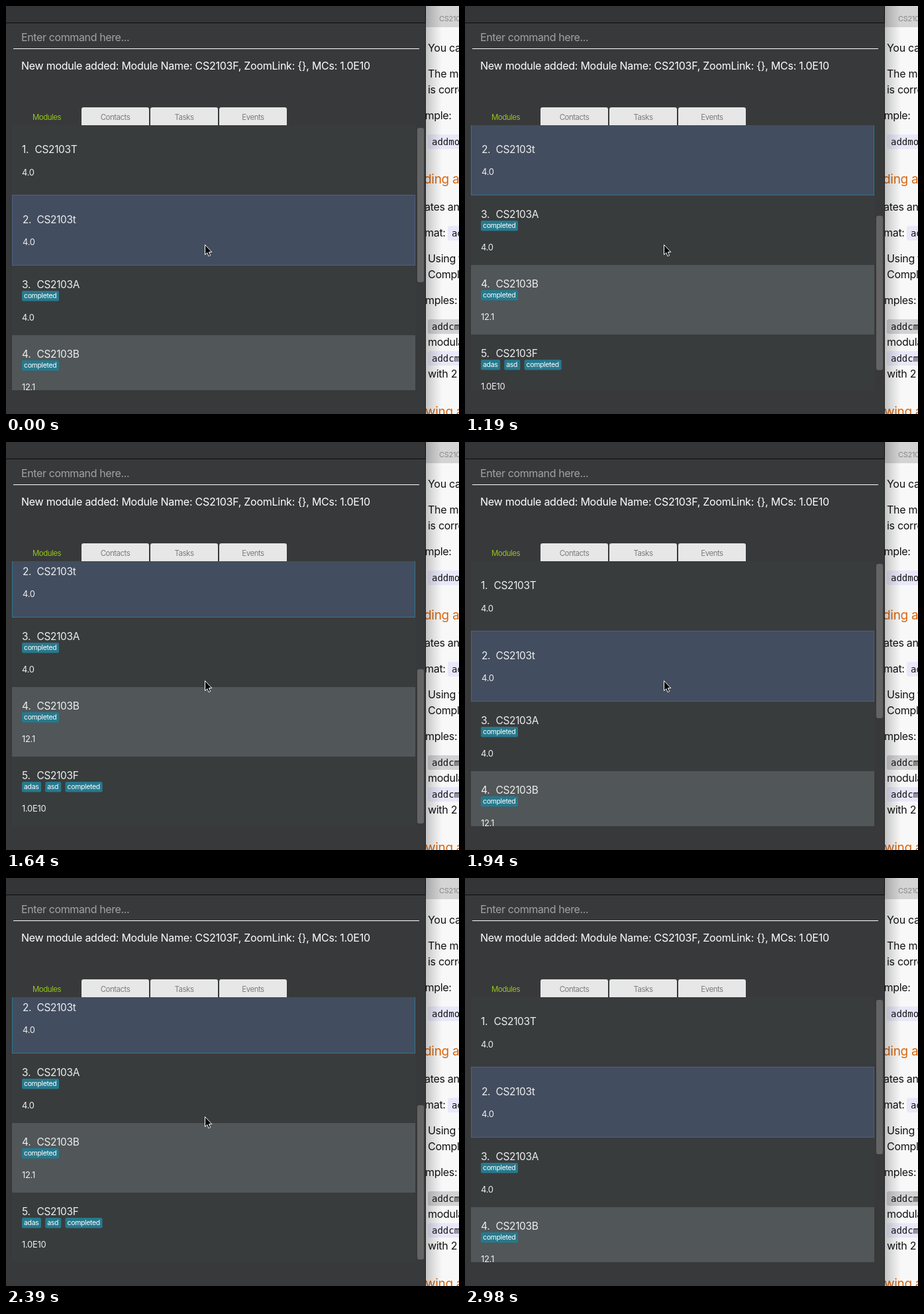
Write an HTML page that moves like this. It is 684 by 616 pixels and loops after 3430 ms.

```html
<!DOCTYPE html>
<html lang="en">
<head>
<meta charset="utf-8">
<title>Module list</title>
<style>
html, body { margin: 0; width: 100%; height: 100%; overflow: hidden; background: #f8f8f8; }
svg { display: block; width: 684px; height: 616px; }
text { font-family: Inter, Roboto, sans-serif; }
.doc { font-size: 16px; letter-spacing: -.3px; fill: #111; }
.head { font-size: 19px; letter-spacing: -.3px; fill: #d9650d; }
.code { font: 14px "DejaVu Sans Mono", monospace; fill: #111; }
.prompt { font-size: 16px; letter-spacing: -.38px; fill: #a2a2a2; }
.result { font-size: 16px; letter-spacing: -.26px; fill: #fff; }
.tab { font-size: 11.5px; letter-spacing: -.5px; text-anchor: middle; fill: #7d7d7d; }
.name { font-size: 15.5px; letter-spacing: -.35px; fill: #eee; }
.credits { font-size: 13px; letter-spacing: -.3px; fill: #eee; }
.tag { font-size: 10.5px; letter-spacing: -.35px; fill: #fff; }
</style>
</head>
<body>
<svg viewBox="0 0 684 616">
  <defs>
    <linearGradient id="shade">
      <stop offset="0" stop-opacity=".22"/>
      <stop offset=".5" stop-opacity=".1"/>
      <stop offset="1" stop-opacity="0"/>
    </linearGradient>
    <clipPath id="view"><path d="M9 180h609v400H9z"/></clipPath>
  </defs>
  <g id="page"></g>
  <path fill="url(#shade)" d="M633 0h25v616h-25z"/>
  <path fill="#38393a" d="M0 0h634v616H0z"/>
  <path fill="#343537" d="M0 0h634v25H0z"/>
  <path fill="none" stroke="#0c0c0c" d="M0 25.5h633.5V0"/>
  <path fill="none" stroke="#222" d="M633.5 26v590"/>
  <path stroke="#fff" d="M11 64.5h613"/>
  <g id="bar"></g>
  <g clip-path="url(#view)"><g id="list"></g></g>
  <rect id="thumb" x="621" y="184" width="10" height="233" rx="3" fill="#646465"/>
  <path id="pointer" fill="#000" stroke="#fff" d="M300.5 360.5v15l3.4-3 2.2 5.2 2.5-1.1-2.2-5.1h4.4z"/>
</svg>
<script>
{
  const $ = id => document.getElementById(id);
  const text = (cls, x, y, s, extra = "") => `<text class="${cls}" x="${x}" y="${y}" ${extra}>${s}</text>`;
  const rect = (x, y, w, h, fill, extra = "") =>
    `<rect x="${x}" y="${y}" width="${w}" height="${h}" fill="${fill}" ${extra}/>`;

  // Document visible behind the window
  const lines = [
    [637, 69, "You can"], [637, 108, "The module"], [637, 132, "is correct"],
    [632.5, 171, "mple:"], [632, 309, "ates and"], [632, 348, "mat:"],
    [637, 387, "Using the"], [637, 411, "Complete"], [633, 450, "mples:"],
    [637, 513, "modular"], [637, 561, "with 2"]
  ];
  const codes = [
    [637, 205, "addmod", "#e9e8fa"], [667, 343, "add", "#e9e8fa"],
    [637, 484, "addcm", "#d2d2d4"], [637, 532, "addcm", "#e9e8fa"]
  ];
  $("page").innerHTML = rect(633, 0, 51, 32, "#d4d4d4")
    + text("doc", 654, 23, "CS2103", 'style="font-size:11px;fill:#888"')
    + lines.map(l => text("doc", ...l)).join("")
    + codes.map(([x, y, s, fill]) => rect(x, y - 11, 60, 22, fill, 'rx="3"') + text("code", x + 6, y + 5, s)).join("")
    + text("head", 631, 268, "ding a") + text("head", 633, 619, "wing a");

  $("bar").innerHTML = text("prompt", 23, 53, "Enter command here...")
    + text("result", 23, 96, "New module added: Module Name: CS2103F, ZoomLink: {}, MCs: 1.0E10")
    + text("tab", 61.5, 171.5, "Modules", 'style="fill:#93c21f"')
    + ["Contacts", "Tasks", "Events"].map((s, i) => {
        const x = 114 + i * 104;
        return `<path fill="#e7e7e7" d="M${x} 180v-24q0-3 3-3h96q3 0 3 3v24z"/>` + text("tab", x + 51, 171.5, s);
      }).join("");

  const tagWidth = { completed: 56, adas: 29, asd: 24 };
  const tags = (names, y) => {
    let x = 24;
    return names.map(s => {
      const out = rect(x, y, tagWidth[s], 15.5, "#27798d", 'rx="2"') + text("tag", x + 3, y + 11.3, s);
      x += tagWidth[s] + 6.3;
      return out;
    }).join("");
  };

  const modules = [
    ["CS2103T", "4.0", []], ["CS2103t", "4.0", []], ["CS2103A", "4.0", ["completed"]],
    ["CS2103B", "12.1", ["completed"]], ["CS2103F", "1.0E10", ["adas", "asd", "completed"]]
  ];
  let y = 180;
  $("list").innerHTML = modules.map(([name, credits, labels], i) => {
    const picked = i === 1, h = picked ? 107 : 105, x = picked ? 25 : 24;
    const titleY = y + (labels.length ? 34 : picked ? 43 : 42);
    const creditsY = y + (labels.length ? 83 : picked ? 76 : 75.5);
    const box = picked
      ? rect(9.5, y + .5, 608, h - 1, "#424d5f", 'id="picked"')
      : rect(9, y, 609, h, i % 2 ? "#515658" : "#393c3d");
    const row = box + text("name", x, titleY, i + 1 + ".") + text("name", i ? 46.5 : 43.5, titleY, name)
      + tags(labels, y + 38) + text("credits", x, creditsY, credits);
    y += h;
    return row;
  }).join("");

  // [start in ms, scroll offset]
  const steps = [[0, 0], [900, 21], [1050, 127], [1190, 106], [1340, 0], [1640, 127],
    [1940, 0], [2240, 21], [2390, 127], [2680, 0]];

  const draw = () => {
    const t = performance.now() % 3430;
    const scroll = steps.filter(s => s[0] <= t).pop()[1];
    $("list").setAttribute("transform", `translate(0 ${-scroll})`);
    $("thumb").setAttribute("y", 184 + scroll * 159 / 127);
    $("picked").setAttribute("stroke", scroll ? "#2a7a90" : "#4f5f80");
    $("pointer").style.display = t < 2980 ? "" : "none";
    requestAnimationFrame(draw);
  };
  draw();
}
</script>
</body>
</html>
```
